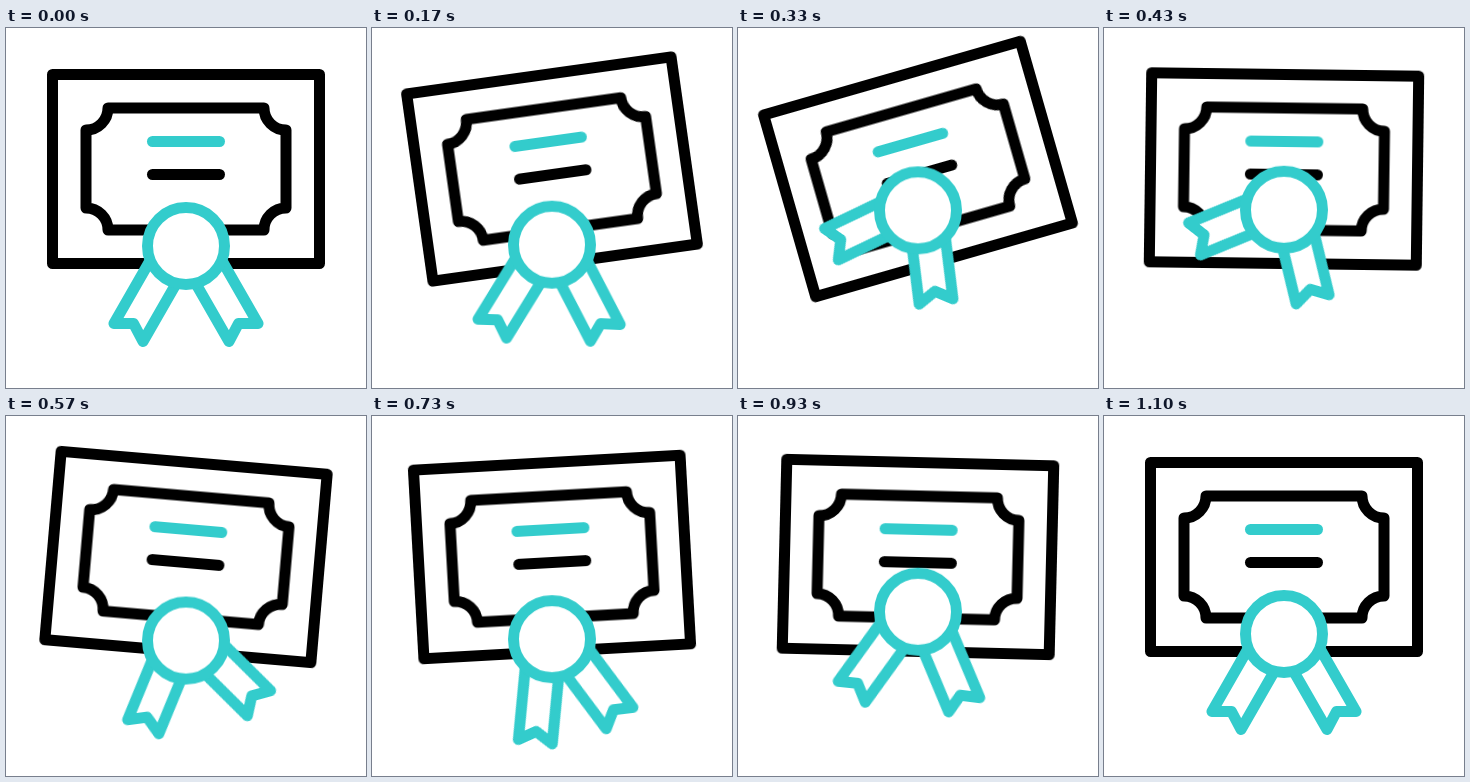
Write an HTML page that moves like this. It is 360 by 360 pixels and loops after 1.67 s.

```html
<!DOCTYPE html>
<html lang="en">
<head>
<meta charset="utf-8">
<title>Certificate</title>
<style>
  html, body { margin: 0; width: 100%; height: 100%; overflow: hidden; background: #fff; }
  svg { display: block; width: 100%; height: 100%; }
  path, rect, circle { stroke-width: 11; stroke-linecap: round; stroke-linejoin: round; fill: #fff; }
  .ink { stroke: #000; }
  .teal { stroke: #33cccc; }
  #sheet { transform-origin: 180px 141px; }
  #left, #right { transform-origin: 180px 218px; }
</style>
</head>
<body>
<svg viewBox="0 0 360 360">
  <defs>
    <path id="ribbon" class="teal" d="M148 225.700L108 295.500H127.500L137 313.500L177 243.700"/>
  </defs>
  <g id="sheet">
    <rect class="ink" x="46.5" y="46.5" width="267" height="189"/>
    <path class="ink" d="M102 80H258A22 22 0 0 0 280 102V180A22 22 0 0 0 258 202H102A22 22 0 0 0 80 180V102A22 22 0 0 0 102 80Z"/>
    <path class="teal" d="M146.500 113.500H213.500"/>
    <path class="ink" d="M146.500 146.500H213.500"/>
  </g>
  <g id="badge">
    <g id="left"><use href="#ribbon"/></g>
    <g transform="matrix(-1 0 0 1 360 0)">
      <g id="right"><use href="#ribbon"/></g>
    </g>
    <circle class="teal" cx="180" cy="218" r="38.500"/>
  </g>
</svg>
<script>
  const LOOP = 1670, LAST = 33, FPS = 30;

  const ease = u => u * u * (3 - 2 * u);

  // Eases from rest through evenly spaced peaks and back to rest by LAST.
  function sway(start, beat, ...peaks) {
    const values = [0, ...peaks, 0];
    return n => {
      const i = Math.floor((n - start) / beat);
      if (i < 0 || i > peaks.length || n >= LAST) return 0;
      const from = start + i * beat;
      const to = Math.min(from + beat, LAST);
      return values[i] + (values[i + 1] - values[i]) * ease((n - from) / (to - from));
    };
  }

  // Winds up to a full tilt, then rings down like a spring.
  function tilt(n) {
    const full = -16, wind = 10, decay = 0.47;
    if (n < wind) return full * ease(n / wind);
    const swings = 4 * (n - wind) / (LAST - wind);
    const settle = Math.min(1, (LAST - n) / 5);
    return full * Math.cos(Math.PI * swings) * decay ** swings * settle;
  }

  const lift = sway(4.2, 7.5, -41, 19, -25);
  const tuck = sway(4, 5.8, 11, 9);

  // A ribbon swings about the medal and slides in along its own length.
  const ribbon = swing => n =>
    `rotate(${swing(n)}deg) translate(${tuck(n) * 0.5}px, ${-tuck(n) * 0.866}px)`;

  function play(id, pose) {
    const steps = [];
    for (let n = 0; n <= LAST; n++) {
      const ms = Math.round(n * 100 / FPS) * 10;
      steps.push({ offset: ms / LOOP, transform: pose(n), easing: 'step-end' });
    }
    steps.push({ offset: 1, transform: pose(LAST) });
    document.getElementById(id).animate(steps, { duration: LOOP, iterations: Infinity });
  }

  play('sheet', n => `rotate(${tilt(n)}deg)`);
  play('badge', n => `translateY(${lift(n)}px)`);
  play('left', ribbon(sway(4, 8, 41, -30, 6)));
  play('right', ribbon(sway(3.5, 7.5, -24, 20, -9)));
</script>
</body>
</html>
```
